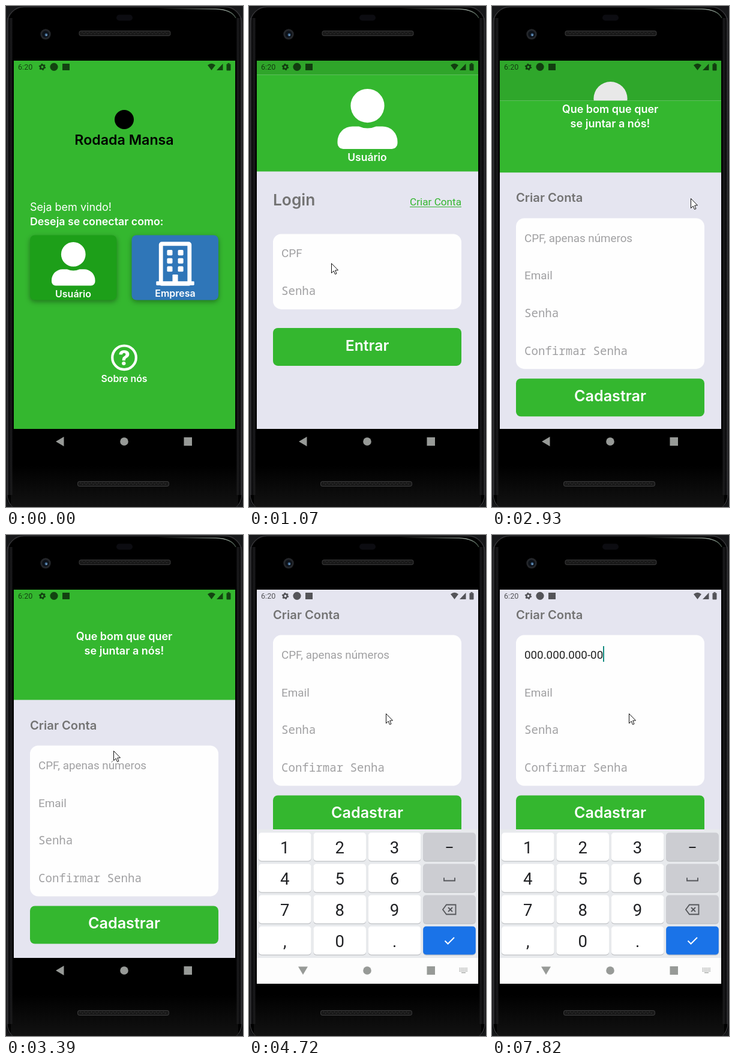
An HTML page with a canvas for the animation above (8 s loop, 395 by 834 pixels).

```html
<!DOCTYPE html>
<html lang="pt-BR">
<head>
<meta charset="utf-8">
<title>App</title>
<style>
html, body { margin: 0; width: 100%; height: 100%; overflow: hidden; background: #000; }
canvas { display: block; width: 395px; height: 834px; }
</style>
</head>
<body>
<canvas id="stage" width="395" height="834"></canvas>
<script>
const c = document.getElementById('stage').getContext('2d');
const LOOP = 8000;
const LEFT = 13, TOP = 91, WIDTH = 369, HEIGHT = 613, BOTTOM = 704, FOLD = 490;
const GREEN = '#34b72f', PAGE = '#e5e5f0', GREY = '#737373', HINT = '#a0a0a2', NAV = '#979a97';
const head = (size, weight = 600) => `${weight} ${size}px Inter, sans-serif`;
const body = size => `${size}px Roboto, sans-serif`;
const mono = size => `${size}px "Noto Sans Mono", monospace`;

const clamp = v => Math.max(0, Math.min(1, v));
const mix = (a, b, p) => a + (b - a) * p;
const span = (t, from, to) => clamp((t - from) / (to - from));

// Bursts of motion: start, end, number of steps.
const bursts = [[70, 540, 7], [770, 1530, 11], [1610, 2300, 10], [2620, 3390, 11],
  [3470, 3620, 3], [3850, 4090, 4], [4490, 4720, 4], [6120, 6430, 5]];

function stepped(t) {
  const burst = bursts.filter(b => b[0] <= t).pop();
  if (!burst) return 0;
  const [from, to, count] = burst, gap = (to - from) / (count - 1);
  return from + Math.min(count - 1, Math.floor((t - from) / gap + 0.15)) * gap;
}

// cubic-bezier(.208, .82, .25, 1)
function reveal(x) {
  if (x <= 0 || x >= 1) return clamp(x);
  const curve = (s, a, b) => 3 * (1 - s) ** 2 * s * a + 3 * (1 - s) * s * s * b + s ** 3;
  let lo = 0, hi = 1;
  for (let i = 0; i < 24; i++) {
    const mid = (lo + hi) / 2;
    if (curve(mid, 0.208, 0.25) < x) lo = mid; else hi = mid;
  }
  return curve(lo, 0.82, 1);
}

function rect(x, y, w, h, fill) { c.fillStyle = fill; c.fillRect(x, y, w, h); }
function box(x, y, w, h, r, fill) {
  c.fillStyle = fill;
  c.beginPath();
  c.roundRect(x, y, w, h, r);
  c.fill();
}
function disc(x, y, r, fill) {
  c.fillStyle = fill;
  c.beginPath();
  c.arc(x, y, r, 0, 7);
  c.fill();
}
function poly(points, fill, stroke, width = 1) {
  c.beginPath();
  points.forEach(([x, y]) => c.lineTo(x, y));
  if (fill) { c.closePath(); c.fillStyle = fill; c.fill(); }
  if (stroke) { c.strokeStyle = stroke; c.lineWidth = width; c.stroke(); }
}
function text(s, x, y, font, fill, align = 'left') {
  c.font = font;
  c.fillStyle = fill;
  c.textAlign = align;
  c.fillText(s, x, y);
}
function clipped(x, y, w, h, draw, r = 0) {
  c.save();
  c.beginPath();
  c.roundRect(x, y, w, h, r);
  c.clip();
  draw();
  c.restore();
}
function moved(x, y, draw, scale = 1) {
  c.save();
  c.translate(x, y);
  c.scale(scale, scale);
  draw();
  c.restore();
}

const userShape = new Path2D('M256 288a144 144 0 1 0 0-288a144 144 0 0 0 0 288z' +
  'M384 320h-55q-73 32-146 0h-55a128 128 0 0 0-128 128v16a48 48 0 0 0 48 48h416a48 48 0 0 0 48-48v-16a128 128 0 0 0-128-128z');

function userIcon(x, y, size) {
  moved(x, y, () => { c.fillStyle = '#fff'; c.fill(userShape); }, size / 512);
}
function buildingIcon(x, y, size) {
  moved(x, y, () => {
    c.strokeStyle = '#fff';
    c.lineWidth = 48;
    c.beginPath();
    c.roundRect(56, 24, 336, 470, 10);
    c.stroke();
    box(0, 464, 448, 48, 10, '#fff');
    for (const wx of [128, 256])
      for (const wy of [96, 192, 288]) box(wx, wy, 64, 64, 12, '#fff');
    box(192, 384, 64, 90, 10, '#fff');
  }, size / 512);
}

function card(x, fill) {
  c.save();
  c.shadowColor = 'rgba(0,0,0,.35)';
  c.shadowBlur = 8;
  c.shadowOffsetY = 3;
  box(x, 381.5, 144.5, 108, 8, fill);
  c.restore();
}

function home(t) {
  rect(LEFT, TOP, WIDTH, HEIGHT + 30, GREEN);
  disc(197, 189, 16, '#000');
  text('Rodada Mansa', 197, 231, head(23.2), '#000', 'center');
  text('Seja bem vindo!', 40, 341, head(18, 400), '#fff');
  text('Deseja se conectar como:', 40, 365, head(17.8), '#fff');
  card(40, '#1d9f19');
  card(209.5, '#2f76b8');
  userIcon(76, 393, 72.5);
  text('Usuário', 112, 485, head(16), '#fff', 'center');
  buildingIcon(250.3, 392.5, 72.5);
  text('Empresa', 282, 484, head(16), '#fff', 'center');
  if (t >= 770) clipped(40, 381.5, 144.5, 108, () =>
    disc(137, 428, mix(20, 130, span(t, 770, 1000)), 'rgba(0,0,0,.12)'), 8);
  c.strokeStyle = '#fff';
  c.lineWidth = 4.2;
  c.beginPath();
  c.arc(197, 585.3, 19.8, 0, 7);
  c.stroke();
  text('?', 197, 597.5, head(34, 800), '#fff', 'center');
  text('Sobre nós', 197, 626, head(15.8), '#fff', 'center');
}

function pageWithHeader() {
  rect(LEFT, TOP, WIDTH, HEIGHT + 30, PAGE);
  rect(LEFT, TOP, WIDTH, 183.5, GREEN);
}

function login(t) {
  pageWithHeader();
  userIcon(147.5, 137, 100);
  text('Usuário', 197, 257, head(17.5), '#fff', 'center');
  text('Login', 40, 331, head(26.3), GREY);
  text('Criar Conta', 268, 331.5, body(17.2), GREEN);
  rect(268, 333, 86, 1, GREEN);
  box(40, 378.5, 314, 125.5, 14, '#fefefe');
  text('CPF', 54, 417.5, body(18.9), HINT);
  text('Senha', 54, 480, mono(19.1), HINT);
  box(40, 535, 314, 63, 8, GREEN);
  text('Entrar', 197, 573, head(24.8), '#fff', 'center');
  if (t >= 2620) {
    const p = 1 - (1 - span(t, 2580, 2805)) ** 3;
    const alpha = 0.12 * (1 - span(t, 2800, 3050));
    disc(mix(331, 311, p), mix(320, 325, p), 44 * p, `rgba(0,0,0,${alpha})`);
  }
}

function typed(t) {
  if (t < 5570) return '';
  let count = 1;
  if (t >= 6120) count = Math.min(10, 3 + Math.floor((stepped(t) - 6120) / 44));
  if (t >= 6730) count = 11;
  const s = '0'.repeat(count).replace(/^000(?=0)/, '000.').replace(/^000\.000(?=0)/, '000.000.');
  return t >= 6900 ? s.replace(/00$/, '-00') : s;
}

const caretShown = t => [[3930, 4490], [5020, 5500], [5570, 7360], [7820, LOOP]]
  .some(([from, to]) => t >= from && t < to);

function signup(t) {
  pageWithHeader();
  text('Que bom que quer', 197, 175, head(18), '#fff', 'center');
  text('se juntar a nós!', 197, 199, head(18), '#fff', 'center');
  text('Criar Conta', 40, 323.5, head(20.2), GREY);
  box(40, 350.5, 314, 251, 14, '#fefefe');
  const value = typed(t);
  text(value || 'CPF, apenas números', 54, 390, body(18.8), value ? '#222' : HINT);
  if (caretShown(t)) {
    const end = value ? c.measureText(value).width : 0;
    rect(Math.round(53.3 + end), 369, 2, 26, '#128b80');
  }
  text('Email', 54, 452.5, body(18.9), HINT);
  text('Senha', 54, 515, mono(19.1), HINT);
  text('Confirmar Senha', 54, 578, mono(19.1), HINT);
  box(40, 617.5, 314, 63, 8, GREEN);
  text('Cadastrar', 197, 655, head(25.2), '#fff', 'center');
}

function transition(p, before, after) {
  moved(0, -0.02 * HEIGHT * p, before);
  rect(LEFT, TOP, WIDTH, HEIGHT, `rgba(0,0,0,${0.1 * p})`);
  const rest = HEIGHT * (1 - p);
  clipped(LEFT, TOP + rest, WIDTH, HEIGHT, () => moved(0, 0.041 * rest, after));
}

function statusBar() {
  const ink = 'rgba(0,0,0,.63)';
  text('6:20', 20, 106, body(12.6), ink);
  c.strokeStyle = ink;
  c.lineWidth = 2.6;
  c.beginPath();
  c.arc(60.5, 101.5, 3.2, 0, 7);
  c.stroke();
  c.lineWidth = 1.5;
  c.setLineDash([2.3, 2.95]);
  c.beginPath();
  c.arc(60.5, 101.5, 5, 0, Math.PI * 2);
  c.stroke();
  c.setLineDash([]);
  disc(80, 101.3, 6.6, ink);
  rect(94, 96, 12, 11, ink);
  c.fillStyle = ink;
  c.beginPath();
  c.moveTo(342.5, 107);
  c.lineTo(336, 98.5);
  c.quadraticCurveTo(342.5, 93, 349, 98.5);
  c.fill();
  poly([[351, 107], [361.5, 96], [361.5, 107]], ink);
  box(367.5, 96.5, 7, 11, 1, ink);
  rect(369.5, 95, 3, 1.5, ink);
}

function keyboard() {
  const ink = '#202124', soft = '#54565a';
  rect(LEFT, FOLD, WIDTH, 214, '#e8eaed');
  rect(LEFT, BOTTOM, WIDTH, 130, '#fdfdfd');
  ['123–', '456_', '789<', ',0.+'].forEach((row, r) => [...row].forEach((key, k) => {
    const x = 16 + k * 91.4, y = 495.5 + r * 52, mid = x + 43.8;
    const fill = key === '+' ? '#1a73e8' : k === 3 ? '#cccdd2' : '#fff';
    box(x, y + 1.2, 87.6, 47, 5, '#bfc1c5');
    box(x, y, 87.6, 47, 5, fill);
    if (k < 3) text(key, mid, y + 34, body(27.5), ink, 'center');
    else if (r === 0) rect(mid - 5.5, y + 23.5, 11, 2, ink);
    else if (r === 1) poly([[mid - 9, y + 23], [mid - 9, y + 28], [mid + 9, y + 28], [mid + 9, y + 23]], null, soft, 1.8);
    else if (r === 2) {
      poly([[mid - 11, y + 24], [mid - 5, y + 16], [mid + 10.5, y + 16], [mid + 10.5, y + 32],
        [mid - 5, y + 32], [mid - 11, y + 24], [mid - 5, y + 16]], null, soft, 1.8);
      poly([[mid - 2, y + 20.5], [mid + 5, y + 27.5]], null, soft, 1.8);
      poly([[mid + 5, y + 20.5], [mid - 2, y + 27.5]], null, soft, 1.8);
    } else poly([[mid - 7.5, y + 24], [mid - 2.5, y + 29], [mid + 8, y + 18.5]], null, '#fff', 2);
  }));
}

function navBar(t, turn) {
  moved(90, 725, () => {
    c.rotate(-turn * Math.PI / 2);
    poly([[-7, 0], [6.5, -8], [6.5, 8]], NAV);
  });
  disc(197, 725, 6.8, NAV);
  rect(296.5, 718, 13.5, 14, NAV);
  if (t >= 4000) {
    for (let row = 0; row < 3; row++)
      for (let i = 0; i < 6; i++) rect(350.5 + i * 2.4, 720.5 + row * 2.5, 1.4, 1.4, NAV);
    rect(354, 728, 7, 1.2, NAV);
  }
}

const cursorPath = [[70, 270, 720], [540, 137, 428], [1300, 137, 428], [1530, 202, 385],
  [2300, 331, 320], [3080, 331, 320], [3390, 179, 359], [3620, 147, 379], [3850, 147, 379], [4090, 228, 297]];

function cursor(t) {
  if (t < 70) return;
  let [, x, y] = cursorPath[0];
  for (let i = 1; i < cursorPath.length; i++) {
    const p = span(t, cursorPath[i - 1][0], cursorPath[i][0]);
    x = mix(x, cursorPath[i][1], p);
    y = mix(y, cursorPath[i][2], p);
  }
  moved(Math.round(x) + 0.5, Math.round(y) + 0.5, () => poly([[0, 0], [0, 16], [3.7, 12.5], [6, 18],
    [8.5, 17], [6.2, 11.5], [11, 11.3], [0, 0]], '#fff', '#111', 1));
}

function speaker(x, y) {
  box(x, y, 153, 9, 4, '#3a3a3b');
  box(x + 1, y + 1, 151, 7, 3, '#191919');
  for (let i = 0; i < 48; i++) rect(x + 5 + i * 3, y + 2 + (i % 2) * 2, 1, 2, '#323232');
}

function phone() {
  rect(0, 0, 395, 834, '#17181a');
  box(1, 1, 393, 836, [30, 30, 20, 20], '#000');
  const side = c.createLinearGradient(0, 0, 395, 0);
  [[0, '#080808'], [0.006, '#2b2b2d'], [0.014, '#0b0b0c'], [0.022, '#1c1c1e'], [0.03, '#000']].forEach(([at, color]) => {
    side.addColorStop(at, color);
    side.addColorStop(1 - at, color);
  });
  clipped(0, 20, 395, 794, () => rect(0, 0, 395, 834, side));
  c.lineWidth = 1.5;
  c.strokeStyle = '#343437';
  c.beginPath();
  c.roundRect(2, 1.5, 391, 840, 28);
  c.stroke();
  const shine = c.createLinearGradient(250, 0, 385, 0);
  shine.addColorStop(0, 'rgba(190,200,195,0)');
  shine.addColorStop(0.85, 'rgba(190,205,195,.75)');
  shine.addColorStop(1, 'rgba(150,190,160,.35)');
  c.strokeStyle = shine;
  c.beginPath();
  c.moveTo(250, 4);
  c.lineTo(350, 5);
  c.quadraticCurveTo(376, 6, 383, 20);
  c.stroke();
  const base = c.createLinearGradient(0, 765, 0, 834);
  base.addColorStop(0, 'rgba(30,30,30,0)');
  base.addColorStop(1, 'rgba(30,30,30,.6)');
  rect(8, 765, 379, 69, base);
  box(184, 14.5, 27, 10, 5, '#0c0c11');
  disc(66, 47, 8.7, '#24262a');
  disc(66, 47, 5.8, '#0d1219');
  disc(67, 48, 2.4, '#3f658d');
  disc(67.5, 48.5, 1, '#8eb5d5');
  speaker(121.5, 41);
  speaker(119, 791);
  rect(LEFT, TOP, WIDTH, 656, '#000');
}

function render(now) {
  const t = stepped(now);
  const typing = now >= 4490;
  const lift = span(t, 4490, 4720);
  const rest = (1 - lift) ** 3;
  phone();
  clipped(LEFT, TOP, WIDTH, (typing ? FOLD : BOTTOM) - TOP, () => {
    if (t < 2760) transition(reveal(span(t, 833, 1258)), () => home(t), () => login(t));
    else if (!typing) transition(reveal(span(t, 2760, 3185)), () => login(t), () => signup(now));
    else moved(0, -184 * (1 - rest), () => signup(now));
  });
  if (typing) clipped(LEFT, FOLD, WIDTH, 257, () => {
    rect(LEFT, FOLD, WIDTH, 257, '#fefefe');
    c.globalAlpha = mix(0.85, 1, lift);
    moved(0, 59.5 * rest, keyboard);
    c.globalAlpha = 1;
    rect(LEFT, BOTTOM, WIDTH, 43, `rgba(0,0,0,${0.17 * rest})`);
  });
  statusBar();
  navBar(now, lift);
  cursor(t);
}

const start = performance.now();
function tick() {
  render((performance.now() - start) % LOOP);
  requestAnimationFrame(tick);
}
tick();
</script>
</body>
</html>
```
